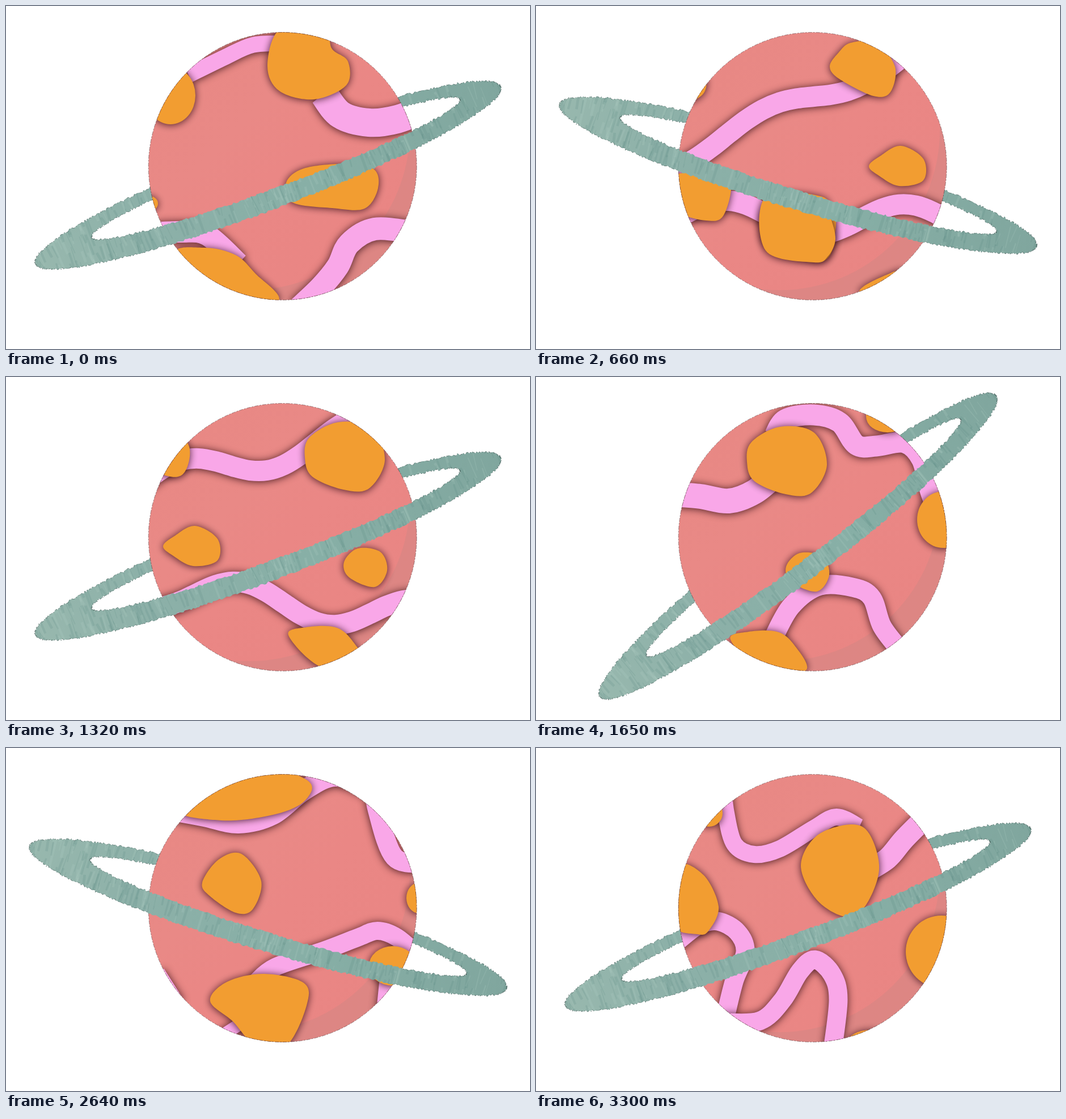
Recreate the animation shown at these times as an HTML page with a canvas. Size 924 by 606 pixels, loop 3630 ms.

```html
<!DOCTYPE html>
<html lang="en">
<head>
<meta charset="utf-8">
<title>Spinning planet</title>
<style>
html, body { margin: 0; width: 100%; height: 100%; overflow: hidden; background: #fff; }
canvas { display: block; }
</style>
</head>
<body>
<canvas id="stage" width="924" height="606"></canvas>
<script>
const STEP = 330;
const PINK = '#f9a7e8', ORANGE = '#f29d31';
const PLANET = { x: 487.7, y: 283, r: 236.5 };
const PIVOT = [462, 299];
const TILT = 18.75;
const DRIFT = [-155, 8];
const TAU = Math.PI * 2;
const ctx = document.getElementById('stage').getContext('2d');

// Blob: x y pairs of a closed curve, or four numbers for an oval (x y rx ry).
// Ribbon: width, then x y pairs of its centre line.
const poseA = {
  blobs: [
    '484 40 461 105 482 150 543 165 600 140 603 98 575 76 560 40',
    '290 158 44 51',
    '494 312 525 287 595 279 648 288 656 322 632 358 575 357 505 347',
    '250 349 18 14',
    '300 440 350 427 405 440 440 473 481 520 400 540'],
  ribbons: [
    '28 322 122 385 91 435 69 490 66',
    '50 560 155 590 192 640 206 690 200 740 180',
    '38 260 401 310 399 355 405 410 455',
    '40 515 535 555 497 585 460 605 420 650 394 720 400']
};
const poseB = {
  blobs: [
    '309 128 340 162 388 174 446 151 455 118 438 92 416 80 407 50 300 70',
    '340 323 370 294 475 285 499 308 485 363 455 371 400 356',
    '565 345 672 346 681 405 665 441 625 437 565 417 552 388'],
  ribbons: [
    '50 283 150 320 199 375 213 435 200 480 168 525 115 565 73 610 45',
    '38 325 475 350 425 395 400 455 415 510 390 560 345 615 313 655 335 666 390 645 480']
};
const poseC = {
  blobs: [
    '363 115 378 91 400 73 445 74 478 115 470 160 440 167 380 137',
    '432 291 452 273 488 255 528 278 528 316 485 326 450 308',
    '250 345 350 345 364 380 373 420 360 450 335 461 250 440',
    '415 513 470 480 500 477 530 518 475 540'],
  ribbons: [
    '36 235 250 300 249 350 230 390 190 425 142 475 107 520 88 556 57 605 68 660 95',
    '38 300 350 355 339 400 355 432 384 500 362 560 337 620 326 650 350 645 400 622 450 618 500']
};
const poseD = {
  blobs: [
    '372 150 380 115 430 88 490 98 513 155 485 205 440 207 385 184',
    '441 335 465 311 505 317 517 350 495 379 450 362',
    '718 252 46 50',
    '620 70 38 28',
    '343 464 375 450 425 450 455 473 476 518 400 520'],
  ribbons: [
    '44 240 207 290 211 340 219 385 203 425 170',
    '37 420 105 440 75 490 67 535 80 565 120 600 122 650 116 680 145 695 200 710 240',
    '34 418 462 450 405 500 369 560 372 592 390 610 440 640 480']
};
const poseE = {
  blobs: [
    '404 155 428 97 475 95 514 175 490 222 430 226 404 200 407 178',
    '510 315 540 298 567 274 590 302 613 345 600 382 530 366',
    '300 452 56 55',
    '514 500 530 457 560 453 590 444 640 470 600 540 520 530'],
  ribbons: [
    '36 250 220 300 188 350 144 400 115 460 110 530 131 580 116 640 75',
    '32 330 420 385 409 420 425 432 470 450 503 510 497 560 435 600 385 650 369 730 360']
};
const poseF = {
  blobs: [
    '300 105 380 128 475 117 528 92 528 55 400 20',
    '346 238 375 197 415 187 450 235 435 285 405 291 360 262',
    '360 447 390 413 455 399 525 415 530 455 495 525 440 525 400 483',
    '682 385 42 35',
    '728 265 22 27'],
  ribbons: [
    '36 290 110 350 121 410 133 470 118 525 75 580 50 640 70',
    '34 650 70 655 110 685 193 740 203',
    '32 440 415 475 387 560 358 620 335 655 323 690 335 730 370',
    '25 672 400 665 470',
    '22 375 512 440 470',
    '20 270 395 305 450']
};
const poseG = {
  blobs: [
    '467 208 495 155 555 135 588 152 605 215 580 280 545 298 495 268',
    '250 210 295 224 322 280 305 322 285 329 240 310',
    '715 360 63 64',
    '590 520 40 22',
    '305 115 24 24'],
  ribbons: [
    '30 330 70 335 115 350 170 385 188 430 178 490 142 530 122 570 140',
    '38 580 220 620 195 650 160 700 110',
    '33 245 345 285 314 320 306 355 325 369 360 350 410 335 470',
    '33 330 485 395 482 435 445 465 395 492 374 522 400 533 445 522 540']
};

function wave(base, slope, height, phase) {
  const line = [36];
  for (let x = 220; x <= 760; x += 30) {
    const u = x - 490;
    line.push(x, base + slope * u + height * Math.sin(u / 50 + phase));
  }
  return line.join(' ');
}

// Between two poses the blobs of both drift together over wavy ribbons.
function between(prev, next, ...ribbons) {
  const [dx, dy] = DRIFT;
  const move = (list, k) => list.map(text => shift(text, dx * k, dy * k));
  return { ribbons, blobs: [...move(prev.blobs, 1), ...move(next.blobs, -1)] };
}

function shift(text, dx, dy) {
  const n = text.split(' ').map(Number);
  const last = n.length === 4 ? 2 : n.length;
  return n.map((v, i) => i < last ? v + (i % 2 ? dy : dx) : v).join(' ');
}

const timeline = [
  [poseA, -TILT],
  [poseB, 0],
  [between(poseB, poseC, wave(160, -.45, 18, 0), wave(375, .02, 28, 1.5)), TILT],
  [poseC, 0],
  [between(poseC, poseD, wave(130, -.25, 28, 2), wave(400, .1, 30, 0)), -TILT],
  [poseD, -35.2],
  [between(poseD, poseE, wave(145, -.3, 20, 1), wave(430, -.2, 28, 2)), -TILT],
  [poseE, 0],
  [poseF, TILT],
  [between(poseF, poseG, wave(130, -.05, 28, 2.5), wave(390, .05, 35, .5)), 0],
  [poseG, -TILT]
];

let seed = 11;
const rand = () => (seed = (seed * 16807) % 2147483647) / 2147483647;

function curve(n, closed) {
  const path = new Path2D(), count = n.length / 2;
  const at = i => {
    const k = closed ? (i + count) % count : Math.max(0, Math.min(count - 1, i));
    return [n[k * 2], n[k * 2 + 1]];
  };
  path.moveTo(n[0], n[1]);
  for (let i = 0; i < (closed ? count : count - 1); i++) {
    const [a, b, c, d] = [at(i - 1), at(i), at(i + 1), at(i + 2)];
    path.bezierCurveTo(
      b[0] + (c[0] - a[0]) / 6, b[1] + (c[1] - a[1]) / 6,
      c[0] - (d[0] - b[0]) / 6, c[1] - (d[1] - b[1]) / 6, c[0], c[1]);
  }
  return path;
}

// Oval with a torn paper edge.
function tear(path, x, y, rx, ry, slope) {
  const steps = Math.round(rx * 1.7);
  for (let i = 0; i < steps; i++) {
    const a = i / steps * TAU, u = rx * Math.cos(a);
    const px = x + u + (rand() - .5) * 2;
    const py = y + slope * u + ry * Math.sin(a) + (rand() - .5) * 3.4;
    if (i) path.lineTo(px, py); else path.moveTo(px, py);
  }
  path.closePath();
}

const ring = new Path2D();
tear(ring, 462, 299, 439, 60, -.036);
tear(ring, 479, 292, 347, 32.5, -.032);

const circle = r => {
  const path = new Path2D();
  path.arc(PLANET.x, PLANET.y, r, 0, TAU);
  return path;
};
const disc = circle(PLANET.r), rim = circle(PLANET.r + 1);
const front = new Path2D('M0 316L924 282V500H0Z');

const teal = ctx.createLinearGradient(22, 0, 902, 0);
teal.addColorStop(0, '#98b8ae');
teal.addColorStop(.25, '#8cb0a8');
teal.addColorStop(.6, '#87afa6');
teal.addColorStop(1, '#80a69e');

const streaks = Array.from({ length: 420 }, () => ({
  x: 20 + rand() * 885, y: 235 + rand() * 115, len: 12 + rand() * 45,
  lean: (rand() - .3) * 10, width: 1 + rand() * 4,
  color: rand() < .5 ? 'rgba(176,205,195,.2)' : 'rgba(84,132,126,.17)'
}));

function scoped(draw) {
  ctx.save();
  draw();
  ctx.restore();
}

function drawRing(angle, edged) {
  ctx.translate(...PIVOT);
  ctx.rotate(angle * TAU / 360);
  ctx.translate(-PIVOT[0], -PIVOT[1]);
  if (!edged) ctx.clip(front);
  ctx.fillStyle = teal;
  ctx.fill(ring, 'evenodd');
  if (edged) {
    ctx.strokeStyle = 'rgba(50,75,70,.7)';
    ctx.lineWidth = .8;
    ctx.setLineDash([5, 3, 2, 4]);
    ctx.stroke(ring);
    ctx.setLineDash([]);
  }
  ctx.clip(ring, 'evenodd');
  for (const s of streaks) {
    ctx.strokeStyle = s.color;
    ctx.lineWidth = s.width;
    ctx.beginPath();
    ctx.moveTo(s.x, s.y);
    ctx.lineTo(s.x + s.lean, s.y + s.len);
    ctx.stroke();
  }
}

function drawGround() {
  const coral = ctx.createLinearGradient(300, 100, 680, 470);
  coral.addColorStop(0, '#e88884');
  coral.addColorStop(.3, '#e98986');
  coral.addColorStop(.5, '#ea8785');
  coral.addColorStop(1, '#e98583');
  ctx.fillStyle = coral;
  ctx.fill(disc);
  const shade = new Path2D('M0 0H924V606H0Z');
  shade.arc(430, 220, 282, 0, TAU);
  ctx.fillStyle = 'rgba(170,135,128,.2)';
  ctx.fill(shade, 'evenodd');
}

function drawRibbon(text) {
  const [width, ...line] = text.split(' ').map(Number);
  ctx.lineWidth = width;
  ctx.stroke(curve(line, false));
}

function drawBlob(text) {
  const n = text.split(' ').map(Number);
  if (n.length > 4) return ctx.fill(curve(n, true));
  ctx.beginPath();
  ctx.ellipse(...n, 0, 0, TAU);
  ctx.fill();
}

function drawPattern(pose) {
  ctx.shadowColor = 'rgba(45,8,16,.85)';
  ctx.shadowBlur = 14;
  ctx.shadowOffsetY = 1;
  ctx.lineJoin = 'round';
  ctx.strokeStyle = PINK;
  pose.ribbons.forEach(drawRibbon);
  ctx.fillStyle = ORANGE;
  pose.blobs.forEach(drawBlob);
}

function render(step) {
  const [pose, angle] = timeline[step];
  ctx.fillStyle = '#fff';
  ctx.fillRect(0, 0, 924, 606);
  scoped(() => drawRing(angle, true));
  scoped(() => {
    ctx.clip(disc);
    drawGround();
    drawPattern(pose);
  });
  scoped(() => {
    ctx.strokeStyle = 'rgba(70,30,35,.6)';
    ctx.lineWidth = .8;
    ctx.setLineDash([7, 2, 3, 2]);
    ctx.stroke(disc);
  });
  scoped(() => {
    ctx.clip(rim);
    drawRing(angle, false);
  });
}

const start = performance.now();
let shown = -1;
function tick() {
  const step = Math.floor((performance.now() - start) / STEP) % timeline.length;
  if (step !== shown) render(shown = step);
  requestAnimationFrame(tick);
}
tick();
</script>
</body>
</html>
```
